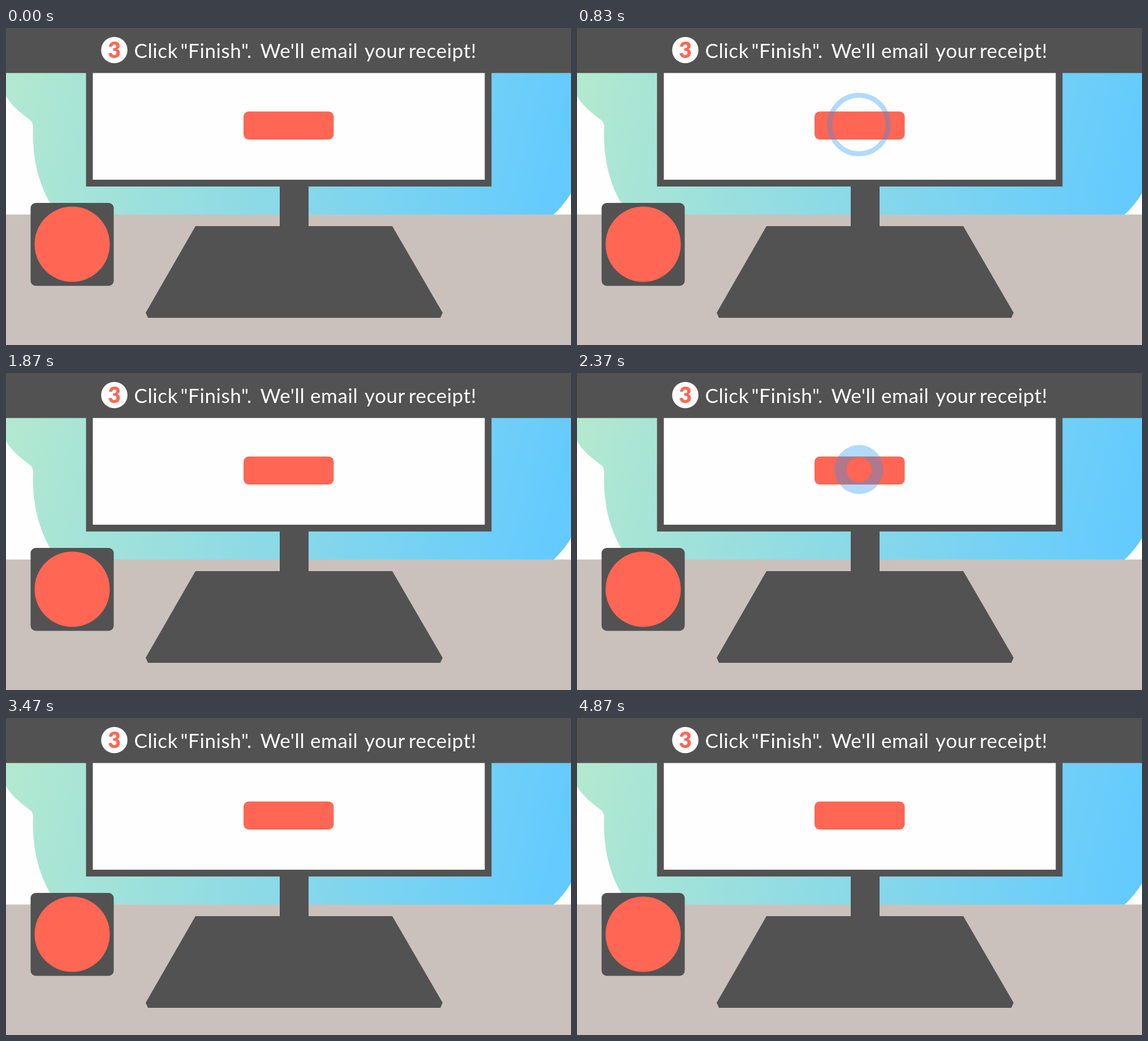
Animation of 999 by 560 pixels, one loop 4910 ms. Source, as an HTML page:

```html
<!DOCTYPE html>
<html lang="en">
<head>
<meta charset="utf-8">
<title>Finish and receipt</title>
<style>
  html, body { margin: 0; width: 100%; height: 100%; overflow: hidden; background: #fff; }
  svg { display: block; width: 999px; height: 560px; }
  .dark { fill: #525252; }
  .coral { fill: #ff6654; }
  .white { fill: #fefefe; }
  text { font-family: Lato, "Open Sans", sans-serif; }
  .title { font-size: 35px; letter-spacing: .6px; fill: #fff; }
  .step { font-size: 39px; font-weight: 900; text-anchor: middle; }
  #ring { fill: none; stroke: rgba(33, 150, 243, .35); }
</style>
</head>
<body>
<svg viewBox="0 0 999 560">
  <defs>
    <linearGradient id="sky" gradientUnits="userSpaceOnUse" x1="0" y1="70" x2="990" y2="300">
      <stop offset="0" stop-color="#b3e9cf"/>
      <stop offset="1" stop-color="#62caff"/>
    </linearGradient>
  </defs>

  <!-- wall -->
  <rect width="999" height="330" fill="url(#sky)"/>
  <path class="white" d="M0 120C10 138 27 151 42 162Q48 166 48 175C46 225 56 272 78 309L92 330H0Z"/>
  <path class="white" d="M968 330Q986 313 999 292V330Z"/>
  <rect y="329.5" width="999" height="230.5" fill="#cac1bd"/>

  <!-- monitor -->
  <path class="dark" d="M141.5 70H858.5V280H535V350H683L772 503L768 512H251L247 503L335 350H484V280H141.5Z"/>
  <rect class="white" x="153.5" y="70" width="693" height="198"/>
  <rect class="coral" x="420" y="147.5" width="159.5" height="49.5" rx="9"/>
  <circle id="ring" cx="498.5" cy="170.5"/>

  <!-- push button -->
  <rect class="dark" x="43.5" y="309" width="147" height="146.5" rx="9"/>
  <circle class="coral" cx="117" cy="382" r="66.5"/>

  <!-- header -->
  <rect class="dark" width="999" height="79.5"/>
  <circle fill="#fff" cx="191.5" cy="39" r="23.3"/>
  <text class="step coral" x="191.5" y="52.5">3</text>
  <text class="title" y="53">
    <tspan x="226.5">Click</tspan>
    <tspan x="308.5">"Finish".</tspan>
    <tspan x="449.5">We'll</tspan>
    <tspan x="538">email</tspan>
    <tspan x="634">your</tspan>
    <tspan x="712">receipt!</tspan>
  </text>
</svg>
<script>
  const LOOP = 4910, PULSE = 1680;
  const ring = document.getElementById('ring');

  // Both edges decelerate; the hole opens later and catches the rim.
  const rim = t => t < 447 ? 0 : 60.3 - 0.00022 * (970 - t) ** 2;
  const hole = t => t < 588 ? 0 : 22 + 0.2 * (t - 690) - 0.00015 * (t - 690) ** 2;

  function draw(now) {
    const t = now % LOOP % PULSE;
    const outer = Math.max(0, rim(t)), inner = hole(t);
    const width = t < 970 ? Math.max(0, outer - inner) : 0;
    ring.setAttribute('r', (outer + inner) / 2);
    ring.setAttribute('stroke-width', width);
    ring.style.display = width > 0 ? '' : 'none';
    requestAnimationFrame(() => draw(performance.now() - start));
  }

  const start = performance.now();
  draw(0);
</script>
</body>
</html>
```
